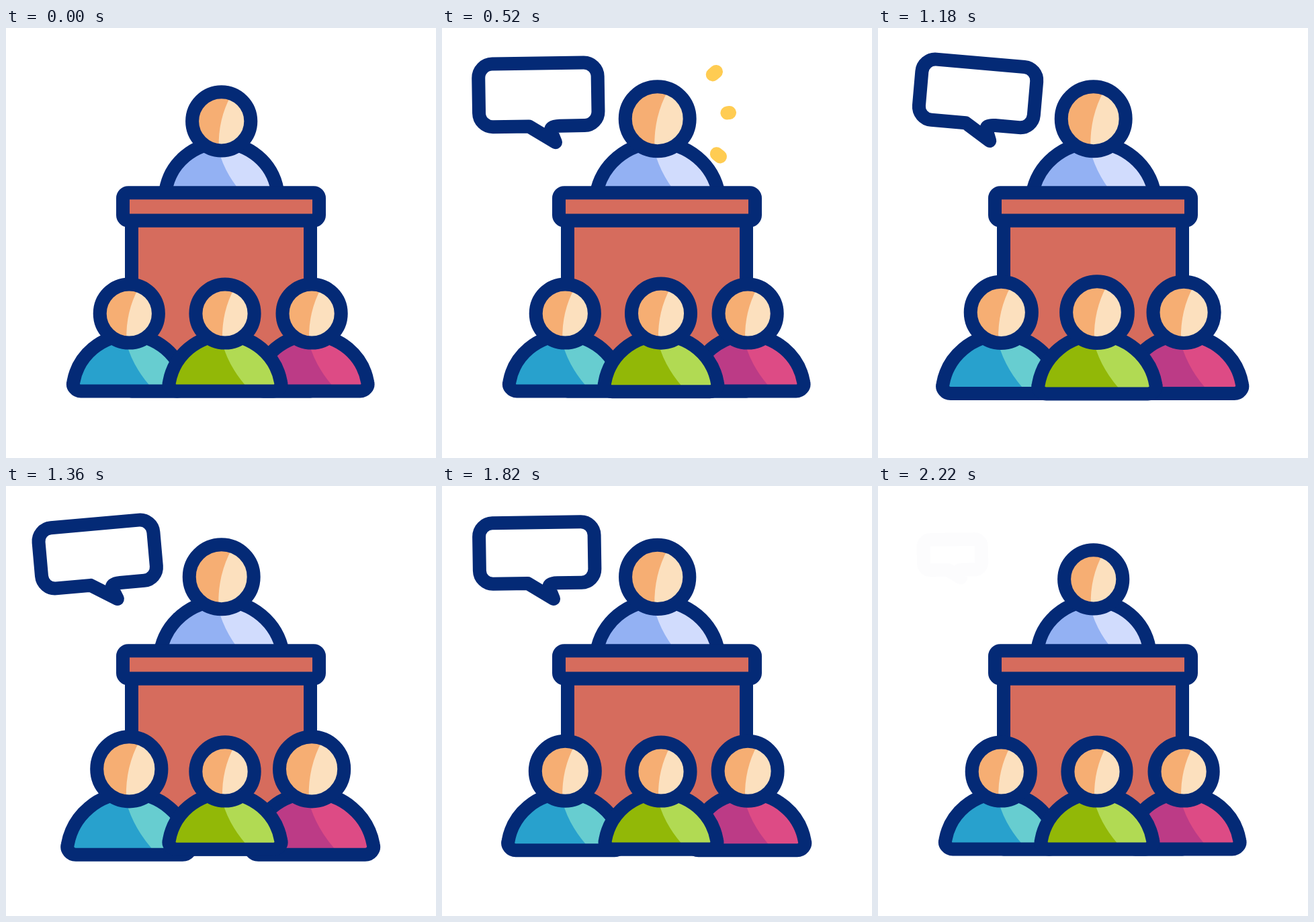
An HTML page for the animation above (2660 ms loop, 640 by 640 pixels).

```html
<!DOCTYPE html>
<html lang="en">
<head>
<meta charset="utf-8">
<title>Speaker and audience</title>
<style>
  html, body { margin: 0; width: 100%; height: 100%; overflow: hidden; background: #fff; }
  svg { display: block; width: 100%; height: 100%; }
  .line { fill: none; stroke: #042a76; stroke-linejoin: round; }
  .spark { stroke: #ffcc52; stroke-width: 20; stroke-linecap: round; }
</style>
</head>
<body>
<svg id="stage" viewBox="0 0 640 640"></svg>
<script>
const LOOP = 2660, LAST_CHANGE = 2220, STEP = 20, STROKE = 20;
const stage = document.getElementById('stage');

function add(tag, attrs, parent = stage) {
  const node = document.createElementNS('http://www.w3.org/2000/svg', tag);
  for (const name in attrs) node.setAttribute(name, attrs[name]);
  return parent.appendChild(node);
}

const clamp = x => Math.min(1, Math.max(0, x));
const ease = x => (1 - Math.cos(Math.PI * clamp(x))) / 2;
const hump = (t, from, to) => Math.sin(Math.PI * clamp((t - from) / (to - from))) ** 2;

// Eased value through [time, value] keys.
function through(t, keys) {
  let value = keys[0][1];
  for (let i = 1; i < keys.length; i++) {
    const [t0, v0] = keys[i - 1], [t1, v1] = keys[i];
    value += (v1 - v0) * ease((t - t0) / (t1 - t0));
  }
  return value;
}

const BODY = 'M-83 66A84.3 84.3 0 0 1 83 66C85 73 79 79.5 72 79.5H-72C-79 79.5 -85 73 -83 66Z';
const BODY_LIGHT = 'M-4 8Q6 46 38 79.5H72C79 79.5 85 73 83 66A84.3 84.3 0 0 0 0 -4.4Z';
const FACE_LIGHT = 'M14 -38Q-5 -3 -4 38A39.1 39.1 0 0 0 14 -38Z';

function person(x, y, dark, light) {
  const group = add('g');
  add('path', { d: BODY, fill: dark }, group);
  add('path', { d: BODY_LIGHT, fill: light }, group);
  add('path', { d: BODY, class: 'line' }, group);
  const head = add('g', { transform: 'translate(0 -36)' }, group);
  add('circle', { r: 43.6, fill: '#f6ae73' }, head);
  add('path', { d: FACE_LIGHT, fill: '#fce0be' }, head);
  add('circle', { r: 43.6, class: 'line' }, head);
  return scale => {
    group.setAttribute('transform', `translate(${x} ${y}) scale(${scale})`);
    group.setAttribute('stroke-width', STROKE / scale);
  };
}

// Lines that grow outward from their inner end, then vanish toward the outer end.
function sparks(start, rays) {
  const half = 190;
  const lines = rays.map(() => add('line', { class: 'spark' }));
  return t => {
    const head = ease((t - start) / half), tail = ease((t - start - half) / half);
    rays.forEach(([x1, y1, x2, y2], i) => {
      const at = (a, b, k) => a + (b - a) * k, line = lines[i];
      line.setAttribute('x1', at(x1, x2, tail));
      line.setAttribute('y1', at(y1, y2, tail));
      line.setAttribute('x2', at(x1, x2, head));
      line.setAttribute('y2', at(y1, y2, head));
      line.style.display = head > 0.01 && tail < 0.99 ? '' : 'none';
    });
  };
}

function podium() {
  const box = { class: 'line', style: 'fill:#d66c5d', 'stroke-width': STROKE };
  add('rect', { ...box, x: 187, y: 286.5, width: 266, height: 254 });
  add('rect', { ...box, x: 174, y: 245.3, width: 292, height: 41.2, rx: 8 });
}

function speechBubble() {
  const bubble = add('path', {
    class: 'line',
    style: 'fill:#fff',
    d: 'M75.5 54.3H207a20 20 0 0 1 20 20V124.8a20 20 0 0 1 -20 20H171Q156 145 159 153' +
       'L165 168.4L127 144.8H75.5a20 20 0 0 1 -20 -20V74.3a20 20 0 0 1 20 -20Z'
  });
  return t => {
    const scale = through(t, [[140, .5], [400, 1.1], [600, 1], [1820, 1], [2000, 1.1], [2230, .5]]);
    const sway = 6 * Math.sin(4 * Math.PI * clamp((t - 640) / 888));
    bubble.setAttribute('transform',
      `rotate(${sway} 166 170) translate(80 105) scale(${scale}) translate(-80 -105) rotate(-.9 141 99.5)`);
    bubble.setAttribute('stroke-width', STROKE / scale);
    bubble.setAttribute('opacity', Math.min(clamp((t - 140) / 120), clamp((2221 - t) / 120)));
  };
}

const speaker = person(320.7, 174.8, '#93b1f3', '#d1dcfd');
podium();
const left = person(183.3, 461, '#28a1cd', '#67cdd0');
const right = person(455.1, 461, '#bc3b86', '#dd4b85');
const middle = person(326, 461, '#92b807', '#b1da53');
const bubble = speechBubble();
const sparkles = [
  sparks(196, [[382, 87, 408, 65], [410, 128, 428, 126], [387.7, 170, 414, 191.5]]),
  sparks(716, [[284, 357, 270, 338.8], [327, 355, 327, 311], [371.5, 360, 385.5, 342]]),
  sparks(1390, [[94, 425.5, 67, 427.5], [116, 388, 85.5, 368.5], [143, 352, 136, 328.5]])
];

function draw(time) {
  const t = Math.min(Math.floor(time % LOOP / STEP) * STEP, LAST_CHANGE);
  const sides = 1 + .115 * hump(t, 965, 1960);
  speaker(through(t, [[130, 1], [510, 1.1], [1740, 1.1], [2200, 1]]));
  left(sides);
  right(sides);
  middle(1 + .12 * hump(t, 430, 1400));
  bubble(t);
  sparkles.forEach(update => update(t));
}

function tick() {
  draw(performance.now());
  requestAnimationFrame(tick);
}
tick();
</script>
</body>
</html>
```
